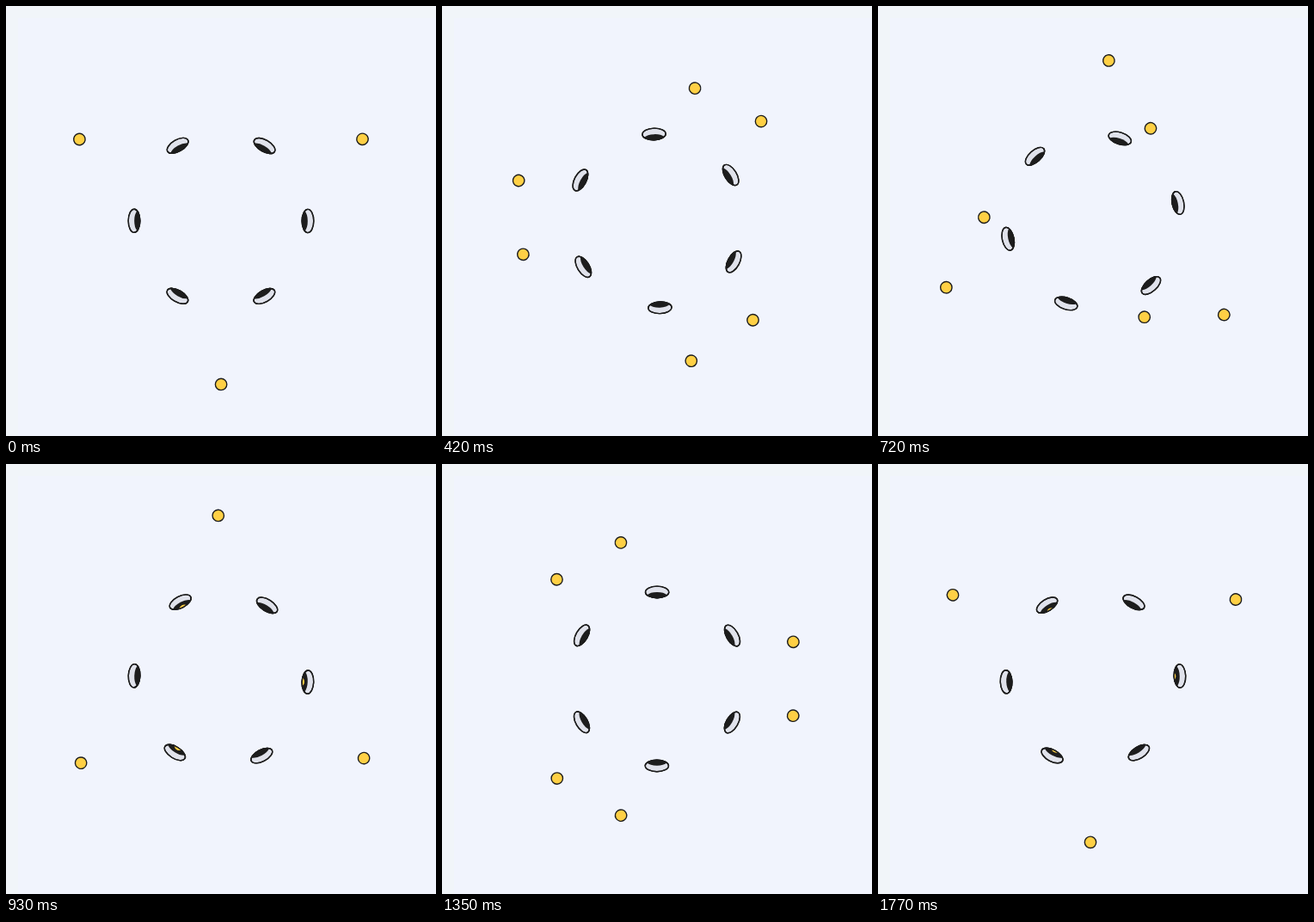
Write an HTML page that moves like this. It is 500 px wide and 500 px high and loops after 1.8 s.

```html
<!DOCTYPE html>
<html lang="en">
<head>
<meta charset="utf-8">
<title>Balls hopping between holes</title>
<style>
  html, body { margin: 0; width: 100%; height: 100%; overflow: hidden; background: #f1f5f9; }
  svg { display: block; width: 100vw; height: 100vh; }
</style>
</head>
<body>
<svg viewBox="0 0 500 500">
  <defs>
    <!-- hides a ball once it is behind the inner lip of a hole -->
    <clipPath id="outside">
      <path d="M-101 60V13.6A6.8 13.6 0 0 0-101-13.6V-60H-220V230H220V-60H101V-13.6A6.8 13.6 0 0 0 101 13.6V60Z"/>
    </clipPath>
    <path id="track" d="M-81 0H-94C-148 0-148 190 0 190S148 0 94 0H81"/>
    <g id="hole">
      <ellipse cx="101" rx="6.8" ry="13.6" fill="#e0e2eb"/>
      <path d="M97.4-11.8A6.8 13.6 0 0 0 97.4 11.8A6.8 13.6 0 0 0 97.4-11.8" fill="#1d1d1d" stroke="none"/>
      <ellipse cx="101" rx="6.8" ry="13.6" fill="none"/>
    </g>
    <path id="lip" d="M101-13.6A6.8 13.6 0 0 0 101 13.6" fill="none"/>
    <circle id="ball" r="6.7" fill="#ffd045"/>
  </defs>
  <rect x="14" y="14" width="486" height="486" fill="#f1f4fd"/>
  <g id="spin" stroke="#1d1d1d" stroke-width="1.4"></g>
</svg>
<script>
  const LOOP = 1800;
  const spin = document.getElementById('spin');
  const track = document.getElementById('track');
  const length = track.getTotalLength();

  function add(parent, tag, attrs) {
    const node = document.createElementNS('http://www.w3.org/2000/svg', tag);
    for (const key in attrs) node.setAttribute(key, attrs[key]);
    return parent.appendChild(node);
  }

  function ring(href) {
    for (let a = 0; a < 360; a += 60) add(spin, 'use', { href, transform: `rotate(${a})` });
  }

  ring('#hole');
  const balls = [];
  for (let a = 0; a < 360; a += 120) {
    const lane = add(spin, 'g', { transform: `rotate(${a})`, 'clip-path': 'url(#outside)' });
    for (const offset of [0, 0.5]) {
      balls.push({ offset, node: add(lane, 'use', { href: '#ball' }) });
    }
  }
  ring('#lip');

  function draw(now) {
    const t = (now % LOOP) / LOOP;
    spin.setAttribute('transform', `translate(250 249.9) rotate(${120 * t})`);
    for (const { offset, node } of balls) {
      const p = track.getPointAtLength((t + offset) % 1 * length);
      node.setAttribute('transform', `translate(${p.x} ${p.y})`);
    }
  }

  const start = performance.now();
  function tick() {
    draw(performance.now() - start);
    requestAnimationFrame(tick);
  }
  tick();
</script>
</body>
</html>
```
